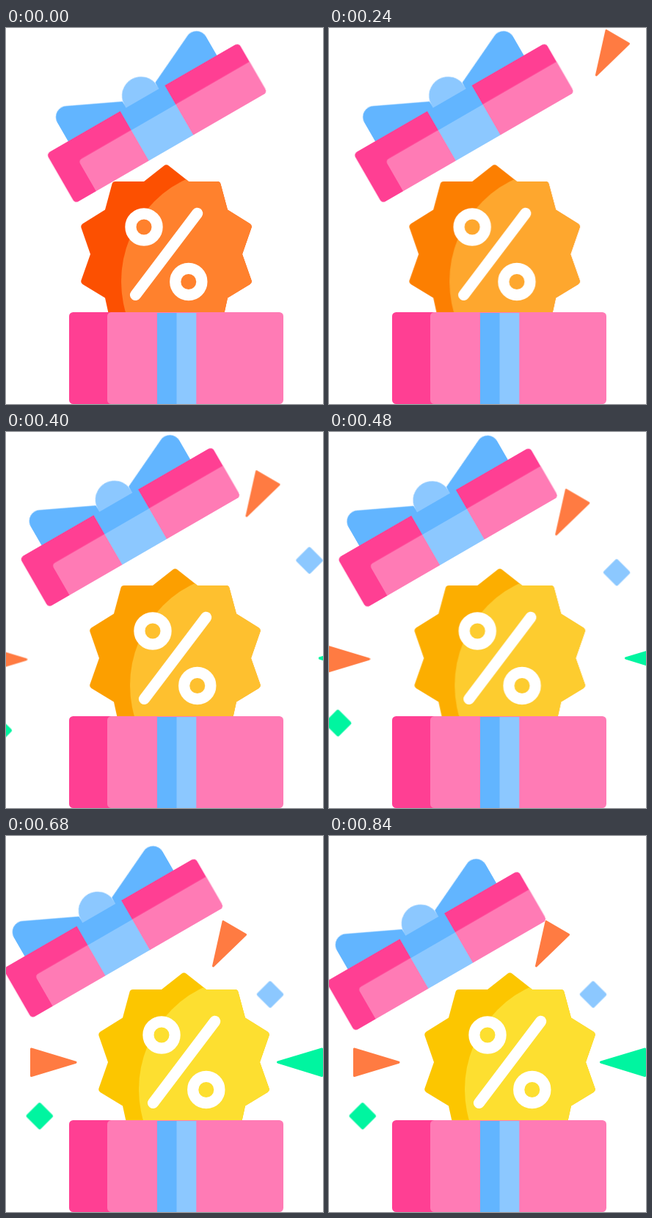
Write an HTML page that moves like this. It is 432 by 512 pixels and loops after 1 s.

```html
<!DOCTYPE html>
<html lang="en">
<head>
<meta charset="utf-8">
<title>Gift box discount</title>
<style>
html, body { margin: 0; width: 100%; height: 100%; overflow: hidden; background: #fff; }
svg { display: block; width: 432px; height: 512px; }

.hot { fill: #ff3f93; }
.pink { fill: #ff7bb5; }
.blue { fill: #62b5ff; }
.sky { fill: #8cc8ff; }
.orange { fill: #ff7b42; stroke: #ff7b42; }
.mint { fill: #00f5a0; stroke: #00f5a0; }
.tri { stroke-width: 3; stroke-linejoin: round; }
.square { stroke: none; }

.lid-x, .lid-y, .badge, .shade, .glow, .bit { animation: 1s infinite; }
.lid-x { animation-name: lid-x; }
.lid-y { animation-name: lid-y; }
.badge { animation-name: slide; }
.shade { animation-name: shade; }
.glow { animation-name: glow; }
.bit { animation-name: fly; animation-timing-function: steps(15); }

/* One step is 40 ms, i.e. 4% of the loop. */
@keyframes lid-x {
  0% { transform: none; animation-timing-function: steps(16); }
  64% { transform: translateX(-58px); animation-timing-function: steps(1); }
  68%, 100% { transform: translateX(-59.2px); }
}
@keyframes lid-y {
  0%, 40% { transform: translateY(0); animation-timing-function: steps(2); }
  48% { transform: translateY(.6px); animation-timing-function: steps(2); }
  56% { transform: translateY(2.3px); animation-timing-function: steps(1); }
  60% { transform: translateY(4.4px); animation-timing-function: steps(2); }
  68% { transform: translateY(9.5px); animation-timing-function: steps(2); }
  76% { transform: translateY(17px); animation-timing-function: steps(2); }
  84%, 100% { transform: translateY(27px); }
}
@keyframes slide {
  0% { transform: translateX(0); animation-timing-function: steps(12); }
  48% { transform: translateX(14.3px); animation-timing-function: steps(2); }
  56% { transform: translateX(18.3px); animation-timing-function: steps(3); }
  68% { transform: translateX(24px); animation-timing-function: steps(4); }
  84%, 100% { transform: translateX(28px); }
}
@keyframes shade {
  0% { fill: rgb(252, 80, 1); animation-timing-function: steps(15); }
  60%, 100% { fill: rgb(252, 198, 0); }
}
@keyframes glow {
  0% { fill: rgb(255, 129, 45); animation-timing-function: steps(15); }
  60%, 100% { fill: rgb(253, 223, 48); }
}
@keyframes fly {
  0% { transform: translate(var(--x), var(--y)); }
  60%, 100% { transform: translate(0, 0); }
}
</style>
</head>
<body>
<svg viewBox="0 0 432 512">
  <defs>
    <path id="star" d="M215 187.7Q218.5 185 222 187.7L249 209H288Q291.5 209 292.4 212L302 247.5L332.5 266.5Q335.5 268.5 334.5 272L322 308L334.5 343.5Q335.5 347 332.5 349L302 367.5L296 395H141L135 367.5L104.5 349Q101.5 347 102.5 343.5L115 308L102.5 272Q101.5 268.5 104.5 266.5L135 247.5L144.6 212Q145.5 209 149 209H188Z"/>
    <clipPath id="star-clip"><use href="#star"/></clipPath>
    <path id="wing" d="M-117 -30V-68.5A15 15 0 0 1 -95.5 -82L-26 -49V-30Z"/>
    <rect id="chip" x="-13.6" y="-13.6" width="27.2" height="27.2" rx="2.5" transform="rotate(45)"/>
  </defs>

  <!-- badge -->
  <g class="badge">
    <use class="shade" href="#star"/>
    <g clip-path="url(#star-clip)"><circle class="glow" cx="310.8" cy="345" r="153.8"/></g>
    <g fill="none" stroke="#fff" stroke-width="15.2" stroke-linecap="round">
      <circle cx="188" cy="271" r="18.1"/>
      <circle cx="248.8" cy="345.5" r="18.1"/>
      <path d="M260.7 252.3L176.5 363.5"/>
    </g>
  </g>

  <!-- box -->
  <rect class="hot" x="86" y="387" width="100" height="125" rx="5.5"/>
  <rect class="pink" x="138" y="387" width="240" height="125" rx="5.5"/>
  <rect class="blue" x="206" y="388" width="27" height="124"/>
  <rect class="sky" x="232.5" y="388" width="26.8" height="124"/>

  <!-- lid -->
  <g class="lid-x"><g class="lid-y">
    <g transform="translate(205.5 129.5) rotate(-30)">
      <use class="blue" href="#wing"/>
      <use class="blue" href="#wing" transform="scale(-1 1)"/>
      <path class="sky" d="M-26 -37V-43A26 26 0 0 1 26 -43V-37Z"/>
      <rect class="hot" x="-151.2" y="-39" width="302.4" height="78" rx="5.5"/>
      <path class="pink" d="M-118 39V-4Q-118 -9.3 -112.5 -9.3H151.2V33.5A5.5 5.5 0 0 1 145.7 39Z"/>
      <rect class="blue" x="-35" y="-39" width="70" height="31"/>
      <rect class="sky" x="-35" y="-9" width="70" height="48"/>
    </g>
  </g></g>

  <!-- confetti -->
  <g class="bit" style="--x:136.5px;--y:-188.3px"><path class="orange tri" d="M282.5 177L296 116.5L326.5 134.3Z"/></g>
  <g class="bit" style="--x:-202.5px;--y:4.5px"><path class="orange tri" d="M34.5 290V326.5L95 308.2Z"/></g>
  <g class="bit" style="--x:169.5px;--y:0px"><path class="mint tri" d="M370.5 308L430.5 290V326.5Z"/></g>
  <g class="bit" style="--x:160.5px;--y:-123px"><use class="sky square" href="#chip" x="0" y="0" transform="translate(360 215.8)"/></g>
  <g class="bit" style="--x:-168px;--y:75px"><use class="mint square" href="#chip" transform="translate(45.8 381.3)"/></g>
</svg>
</body>
</html>
```
